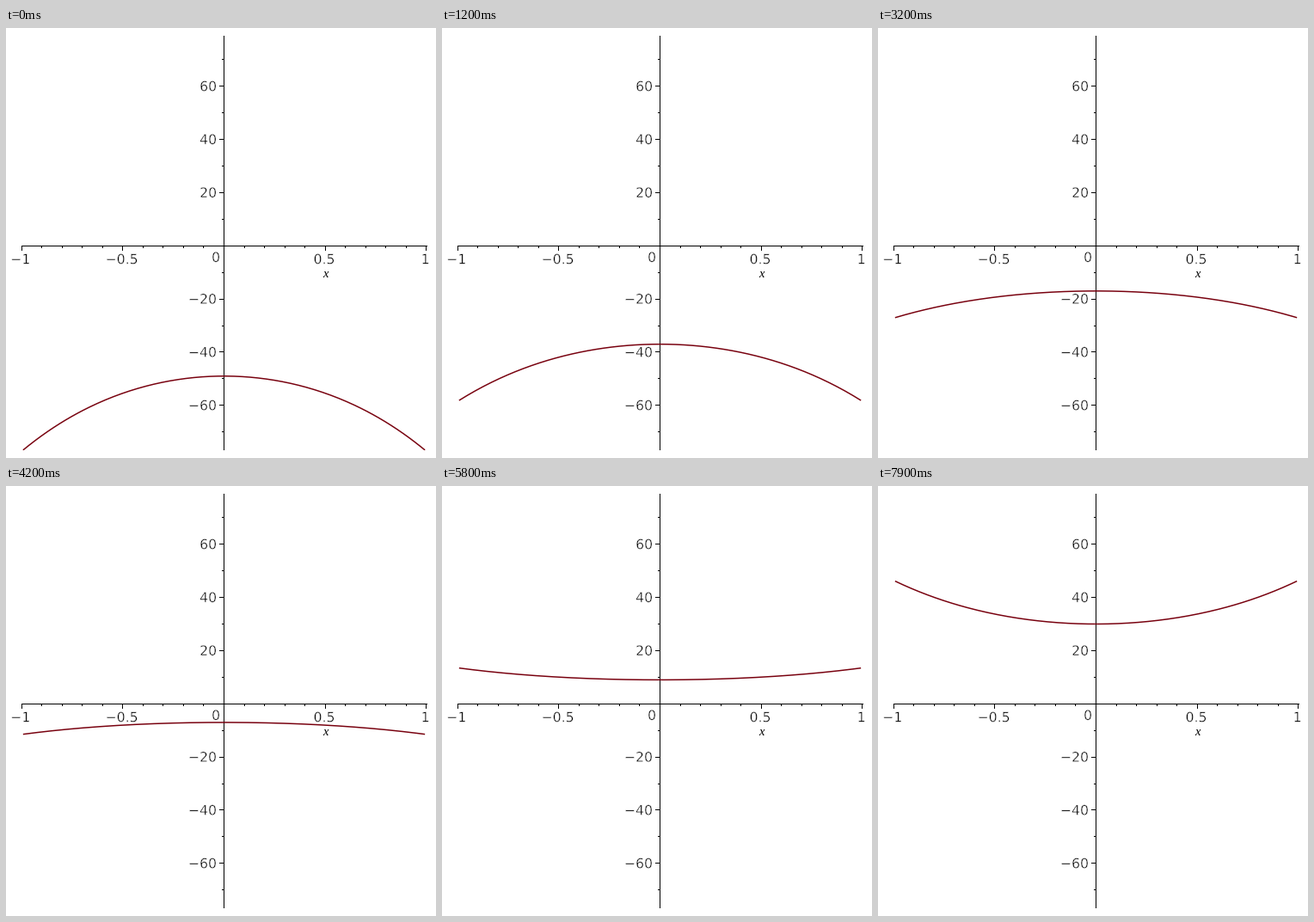
A matplotlib script that plays this animation: 500x500 px, repeating every 8000 ms.

```python
import numpy as np
import matplotlib.pyplot as plt
from matplotlib.animation import FuncAnimation
from matplotlib.patches import Rectangle
from matplotlib.patheffects import Stroke

SIZE, DPI = 500, 100
PX = 72 / DPI                      # one pixel in points
X0, Y0 = 253.5, 253.25             # origin of the plot
SX, SY = 235.4, 3.092              # pixels per unit
FRAMES, STEP, START = 80, 100, -49

fig = plt.figure(figsize=(SIZE / DPI, SIZE / DPI), dpi=DPI, facecolor="white")
ax = fig.add_axes([0, 0, 1, 1])
ax.set_xlim(0, SIZE)
ax.set_ylim(SIZE, 0)
ax.axis("off")

# A white rim thins the numerals to a light weight
THIN = [Stroke(linewidth=0.45 * PX, foreground="white")]


def line(x, y, width=1.0, color="black", **kw):
    return ax.plot(x, y, color=color, lw=width * PX, snap=False,
                   solid_capstyle="butt", **kw)[0]


def hline(y, left, right):
    y = np.floor(y) + 0.5
    line([left, right], [y, y])


def vline(x, top, bottom):
    x = np.floor(x) + 0.5
    line([x, x], [top, bottom])


def label(value, x, y, align="center"):
    ax.text(x, y, f"{value:g}".replace("-", "\u2212"), family="DejaVu Sans",
            size=15.7 * PX, ha=align, va="baseline", path_effects=THIN)


# Axes
hline(Y0, 18, 490)
vline(X0, 9, 491)
for i in range(-10, 11):
    x = X0 + SX * i / 10
    major = i % 5 == 0
    vline(x, 253, 259 if major else 256)
    if i and major:
        label(i / 10, x - 1.2, 274.2)
for v in range(-70, 71, 10):
    y = Y0 - SY * v
    major = v % 20 == 0
    hline(y, 248 if major else 251, 254)
    if v and major:
        label(v, 245, y + 5.5, "right")
label(0, 244, 272)
ax.text(371, 289.9, "x", family="Liberation Serif", style="italic",
        size=14.5 * PX, ha="center", va="baseline")

# Curve family y = 1 + (k - 1) g(x), one value of k per step
xs = np.linspace(-0.9925, 0.9925, 201)
g = 1 + xs**2 / 2 + xs**4 / 16 + xs**6 / 288
curve = line(X0 + SX * xs, 0 * xs, 1.5, "#78000e", zorder=5)
curve.set_clip_path(Rectangle((0, 9), SIZE, 482, transform=ax.transData))


def update(n):
    k = START + n
    curve.set_ydata(Y0 - SY * (1 + (k - 1) * g))
    return curve,


anim = FuncAnimation(fig, update, frames=FRAMES, interval=STEP,
                     repeat=True, repeat_delay=0)
plt.show()
```
